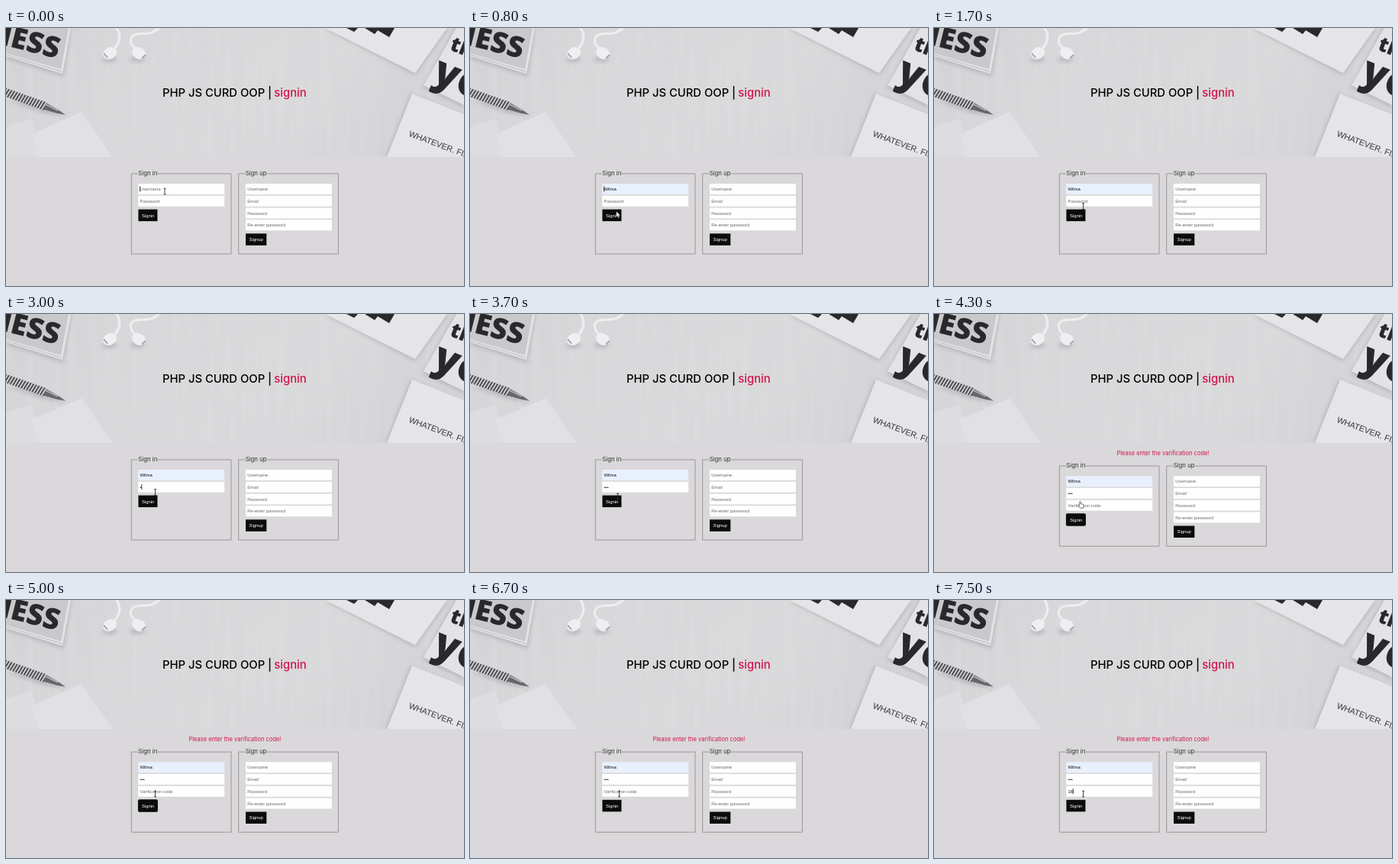
Animation of 600x338 px, one loop 8000 ms. Source, as an HTML page:

```html
<!DOCTYPE html>
<html lang="en">
<head>
<meta charset="utf-8">
<title>Sign in form</title>
<style>
  html, body { margin: 0; height: 100%; overflow: hidden; background: #dad8da; }
  svg { display: block; width: 600px; height: 338px; }
  text { white-space: pre; }
  .brand { font-family: Inter, sans-serif; }
  .field { font: 5.9px "Liberation Sans", Arial, sans-serif; }
  .bold { font-family: "Open Sans", Roboto, sans-serif; font-weight: 800; font-stretch: 75%; fill: #29282b; }
  .red { fill: #d0134a; }
  .frame { fill: none; stroke: #98969a; }
</style>
</head>
<body>
<svg viewBox="0 0 600 338">
  <defs>
    <linearGradient id="desk" x2="1" y2=".2">
      <stop offset="0" stop-color="#d3d2d5"/>
      <stop offset=".35" stop-color="#d8d7d9"/>
      <stop offset=".75" stop-color="#d9d8da"/>
      <stop offset="1" stop-color="#d3d2d5"/>
    </linearGradient>
    <filter id="grain" x="0" y="0" width="1" height="1">
      <feTurbulence type="fractalNoise" baseFrequency=".11 .008" numOctaves="2" seed="4"/>
      <feColorMatrix values="0 0 0 0 1  0 0 0 0 1  0 0 0 0 1  1.2 0 0 0 -.45"/>
    </filter>
    <filter id="soft" x="-20%" y="-20%" width="140%" height="140%">
      <feGaussianBlur stdDeviation="2.5"/>
    </filter>
    <clipPath id="photo"><path d="M0 0H600V169H0z"/></clipPath>
    <pattern id="coil" width="3.8" height="12" patternUnits="userSpaceOnUse" patternTransform="skewX(-12)">
      <path d="M0 0H4V12H0z" fill="#cfced1"/><path d="M0 0H1.9V12H0z" fill="#4a494d"/>
    </pattern>
  </defs>

  <path d="M0 0H600V338H0z" fill="#dad8da"/>
  <g clip-path="url(#photo)">
    <path d="M0 0H600V169H0z" fill="url(#desk)"/>
    <path d="M0 0H600V169H0z" filter="url(#grain)" opacity=".16"/>

    <!-- shadows -->
    <g filter="url(#soft)" fill="#8f8e92" opacity=".4">
      <path d="M0 40L75 64L86 0H0z"/>
      <path d="M418 1L536 62L580 0z"/>
      <path d="M588 0L546 78L600 104V0z"/>
      <path d="M530 86L497 169H600V115z"/>
      <path d="M0 94L48 111L80 116L50 99z"/>
      <ellipse cx="136" cy="41" rx="10" ry="4"/>
      <ellipse cx="172" cy="41" rx="10" ry="4"/>
    </g>

    <!-- book -->
    <path d="M0 37L74 60L85 0H0z" fill="#e3e2e4"/>
    <path d="M0 33L72 54L82 0H0z" fill="#c9c8cb"/>
    <path d="M0 35L73 57" stroke="#b3b2b6" stroke-width=".8"/>
    <text class="bold" font-size="38" text-anchor="end" transform="translate(67 40) rotate(14)">MESS</text>

    <!-- earphones -->
    <g fill="none" stroke="#eeedef" stroke-width="3.2" stroke-linecap="round">
      <path d="M145 0C151 10 150 18 141 29M200 0C190 12 172 4 166 10C161 16 163 22 172 30"/>
    </g>
    <g fill="#efeef0">
      <ellipse cx="136" cy="33" rx="9.5" ry="7.5" transform="rotate(-30 136 33)"/>
      <ellipse cx="174" cy="33" rx="9.5" ry="7.5" transform="rotate(30 174 33)"/>
    </g>
    <path d="M128 33L133 39M178 40L183 35" stroke="#a3a2a6" stroke-width="1.8"/>

    <!-- papers and pen, left -->
    <path d="M0 129L34 119L48 169H0z" fill="#dddcde"/>
    <path d="M99 110L140 169H43L33 139z" fill="#e1e0e2"/>
    <g transform="translate(0 85) rotate(19.5)">
      <path d="M-5 -6H54V5H-5z" fill="url(#coil)"/>
      <path d="M54 -5L72 -2L83 1L72 3L54 4z" fill="#66656a"/>
      <path d="M54 -3L72 -1" stroke="#bebdc0" stroke-width="1.5"/>
    </g>

    <!-- cards, right -->
    <path d="M418 0L536 59L578 0z" fill="#e5e4e6"/>
    <path d="M446 0L456 5L461 0zM470 0L483 8L487 3L502 12L509 0z" fill="#29282b"/>
    <path d="M590 0L547 75L600 101V0z" fill="#e3e2e4"/>
    <text class="bold" font-size="27" transform="translate(580 28) rotate(22)">the</text>
    <text class="bold" font-size="54" transform="translate(556 70) rotate(22)">you</text>
    <path d="M532 86L499 169H600V113z" fill="#e5e4e6"/>
    <text font-family="Liberation Sans, Arial, sans-serif" font-size="10.8" fill="#343337" transform="translate(527 141.5) rotate(20.5)">WHATEVER. FINE</text>
  </g>

  <g class="brand" font-size="14.8" font-weight="500">
    <text x="205" y="90">PHP JS CURD OOP |</text>
    <text class="red" x="351.3" y="90">signin</text>
  </g>
  <text id="notice" class="brand red" x="300" y="184.5" font-size="7.5" text-anchor="middle">Please enter the varification code!</text>

  <g id="form"></g>

  <path id="beam" d="M-1.5 -3.8H1.5M0 -3.8V3.8M-1.5 3.8H1.5" fill="none" stroke="#333" stroke-width=".9"/>
  <path id="arrow" d="M0 0V8L1.9 6.3L3.2 9.2L4.6 8.6L3.3 5.8H5.8z" fill="#fff" stroke="#111" stroke-width=".6"/>
  <path id="hand" d="M-.8 .7Q0 -.5 .8 .7V3.4L4 4.1Q4.9 4.4 4.7 5.6L4 9H-.2L-2.8 5.7Q-2.6 4.4 -.8 5.6z" fill="#fff" stroke="#111" stroke-width=".6"/>
</svg>

<script>
const LOOP = 8000, TICK = 100, USER = "Wilma";
const $ = id => document.getElementById(id);

// time, x, y of the pointer
const path = [
  [0, 208, 214], [400, 208, 214], [800, 191.5, 240], [900, 191.5, 240],
  [1000, 191.5, 241.5], [1200, 191.5, 241.5], [1500, 192, 212],
  [1700, 195.5, 233.5], [3400, 195.5, 233.5], [4000, 191.5, 244.5],
  [4600, 191.5, 246], [4800, 203, 250], [5000, 195.5, 254], [LOOP, 195.5, 254]
];

const within = (t, a, b) => t >= a && t < b;

function pointerAt(t) {
  const i = path.findIndex(p => p[0] > t);
  const [t0, x0, y0] = path[i - 1], [t1, x1, y1] = path[i];
  const k = (t - t0) / (t1 - t0);
  return [x0 + (x1 - x0) * k, y0 + (y1 - y0) * k];
}

function pointerKind(t) {
  if (within(t, 700, 1000)) return "arrow";
  if (within(t, 1000, 1400) || within(t, 3800, 4700)) return "hand";
  return "beam";
}

const rect = (x, y, w, h, fill, r = 0) =>
  `<rect x="${x}" y="${y}" width="${w}" height="${h}" rx="${r}" fill="${fill}"/>`;

const label = (x, y, s, fill) =>
  `<text class="field" x="${x}" y="${y}" fill="${fill}">${s}</text>`;

function input(x, y, hint, value = "", caretX = null, fill = "#fefefe") {
  return rect(x, y, 113, 14, fill) +
    label(x + 2.3, y + 9.1, value || hint, value ? "#111" : "#6a696c") +
    (caretX === null ? "" : rect(x + 2 + caretX, y + 3.3, .8, 7.2, "#111"));
}

function button(x, y, w, s, focused) {
  const g = focused ? .5 : 0;
  return rect(x - g, y - g, w + 2 * g, 15.5 + 2 * g, "#0c0c0d", focused ? 2 : 0) +
    label(x + 4.5, y + 9.9, s, "#fff");
}

function fieldset(x, gapEnd, title) {
  return `<path class="frame" d="M${x + 9} 190.9H${x}V296H${x + 130.7}V190.9H${gapEnd}"/>` +
    `<text class="brand" x="${x + 9}" y="193.2" font-size="7.8" fill="#333">${title}</text>`;
}

function formAt(t) {
  const asked = t >= 4300;
  const dots = "•".repeat((t >= 3000) + (t >= 3100) + (t >= 3300));
  const code = t < 6900 ? "" : t < 7200 ? "1" : "18";
  const named = t >= 500;
  const userCaret = t < 1000 ? 0 : null;
  const passCaret = within(t, 1900, 2400) || within(t, 3000, 3700) ? dots.length * 2.1 + .1 : null;
  const codeCaret = within(t, 5200, 5600) || within(t, 6200, 6700) || t >= 6900 ? code.length * 3.3 : null;

  const left = fieldset(164.3, 198.5, "Sign in") +
    input(173.2, 204, "Username", named ? USER : "", userCaret, named ? "#e8f0fe" : "#fefefe") +
    input(173.2, 219.7, "Password", dots, passCaret) +
    (asked ? input(173.2, 235.5, "Varification code", code, codeCaret) : "") +
    button(173.4, asked ? 253.6 : 237.6, 25, "Signin", within(t, 4100, 5200));

  const right = fieldset(304.7, 342, "Sign up") +
    ["Username", "Email", "Password", "Re-enter password"]
      .map((hint, i) => input(313.9, 204 + i * 15.75, hint)).join("") +
    button(314, 269.3, 27.3, "Signup");

  return left + right;
}

let last = -1;
function draw(now) {
  const t = Math.floor(now % LOOP / TICK) * TICK;
  if (t !== last) {
    last = t;
    const asked = t >= 4300;
    $("form").innerHTML = formAt(t);
    $("form").setAttribute("transform", `translate(0 ${asked ? 8.2 : 0})`);
    $("notice").style.display = asked ? "" : "none";
    const kind = pointerKind(t);
    for (const id of ["beam", "arrow", "hand"]) {
      $(id).style.display = id === kind ? "" : "none";
      $(id).setAttribute("transform", `translate(${pointerAt(t)})`);
    }
  }
  requestAnimationFrame(draw);
}
draw(0);
</script>
</body>
</html>
```
